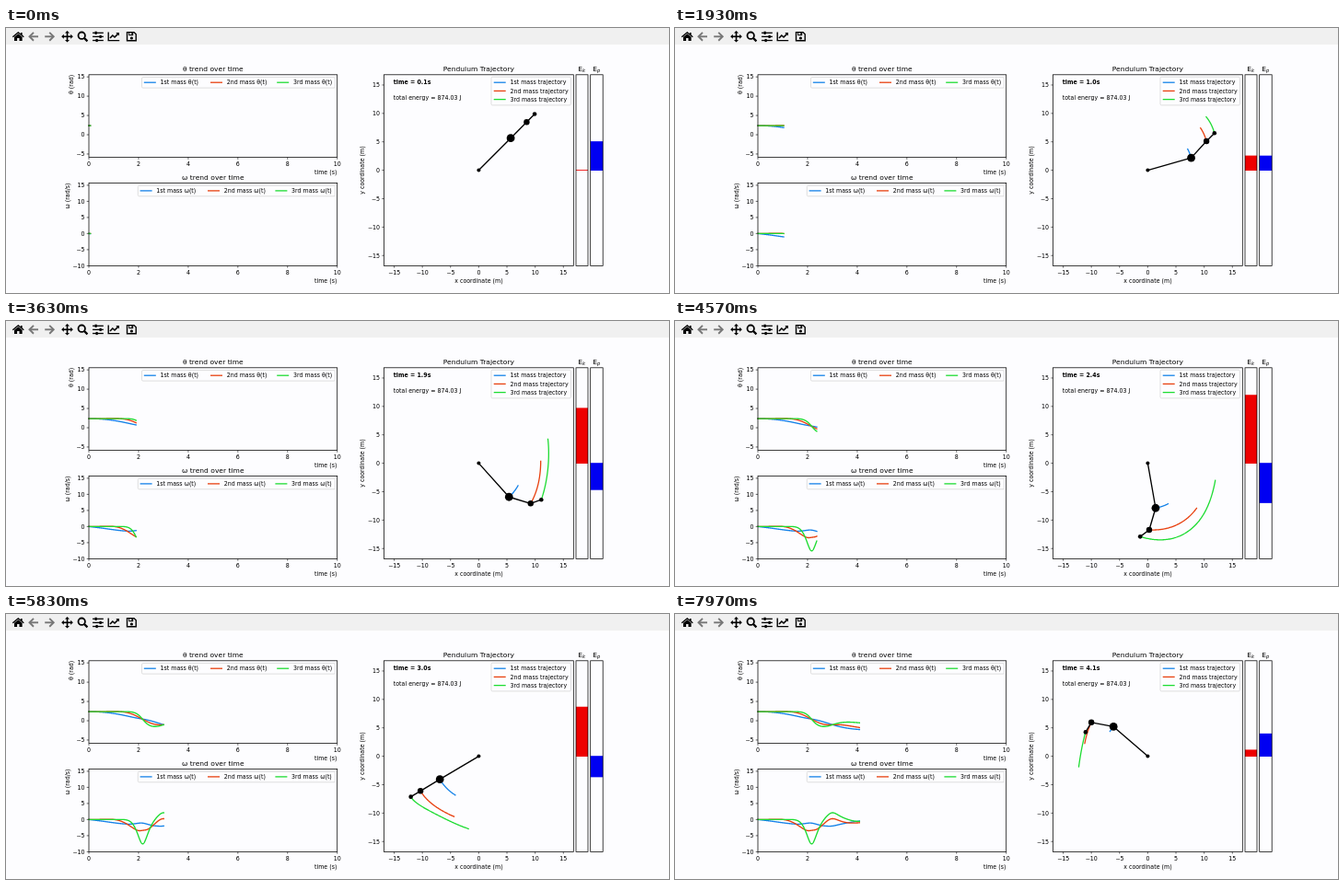
These frames come from a looping animation (720 px wide and 288 px high, 8 s). An HTML page with a canvas:

```html
<!DOCTYPE html>
<html lang="en">
<head>
<meta charset="utf-8">
<title>Triple pendulum</title>
<style>
  html, body { margin: 0; width: 100%; height: 100%; overflow: hidden; background: #fdfdff; }
  canvas { display: block; width: 720px; height: 288px; }
</style>
</head>
<body>
<canvas id="stage"></canvas>
<script>
const canvas = document.getElementById('stage');
const ctx = canvas.getContext('2d');
const dpr = window.devicePixelRatio || 1;
canvas.width = 720 * dpr;
canvas.height = 288 * dpr;

const LOOP = 8000;
const START = 0.06, STEP = 0.01687;
const COLORS = ['#1482e8', '#e8400f', '#1edc32'];
const NAMES = ['1st', '2nd', '3rd'];
const PAPER = '#fdfdff';

// ---------- physics ----------
const G = 9.81, DT = 0.005;
const MASS = [8, 4, 1], LEN = [8, 4, 2];
const TRAIL = [0.25, 0.435, 0.63];
const load = [13, 5, 1]; // mass carried by each rod

function solve3(a, b) {
  for (let i = 0; i < 3; i++) {
    for (let r = i + 1; r < 3; r++) {
      const f = a[r][i] / a[i][i];
      for (let c = i; c < 3; c++) a[r][c] -= f * a[i][c];
      b[r] -= f * b[i];
    }
  }
  for (let i = 2; i >= 0; i--) {
    for (let c = i + 1; c < 3; c++) b[i] -= a[i][c] * b[c];
    b[i] /= a[i][i];
  }
  return b;
}

// state: three angles from straight down, then three angular speeds
function derive(s) {
  const a = [], b = [];
  for (let i = 0; i < 3; i++) {
    a.push([]);
    b.push(-G * load[i] * LEN[i] * Math.sin(s[i]));
    for (let j = 0; j < 3; j++) {
      const k = load[Math.max(i, j)] * LEN[i] * LEN[j];
      a[i].push(k * Math.cos(s[i] - s[j]));
      b[i] -= k * Math.sin(s[i] - s[j]) * s[j + 3] ** 2;
    }
  }
  return [s[3], s[4], s[5], ...solve3(a, b)];
}

const shift = (s, d, h) => s.map((v, i) => v + d[i] * h);

function rk4(s) {
  const k1 = derive(s);
  const k2 = derive(shift(s, k1, DT / 2));
  const k3 = derive(shift(s, k2, DT / 2));
  const k4 = derive(shift(s, k3, DT));
  return s.map((v, i) => v + DT / 6 * (k1[i] + 2 * k2[i] + 2 * k3[i] + k4[i]));
}

const states = [[0.75 * Math.PI, 0.75 * Math.PI, 0.75 * Math.PI, 0, 0, 0]];
while (states.length < 860) states.push(rk4(states[states.length - 1]));

function stateAt(t) {
  const i = Math.floor(t / DT), f = t / DT - i;
  return states[i].map((v, n) => v + (states[i + 1][n] - v) * f);
}

function joints(s) {
  let x = 0, y = 0;
  return LEN.map((l, i) => {
    x += l * Math.sin(s[i]);
    y -= l * Math.cos(s[i]);
    return [x, y];
  });
}

// ---------- drawing helpers ----------
function text(s, x, y, o = {}) {
  ctx.save();
  ctx.translate(x, y);
  if (o.up) ctx.rotate(-Math.PI / 2);
  ctx.scale(0.1, 0.1);
  ctx.font = `${o.style || ''} ${(o.size || 6.3) * 10}px "DejaVu Sans", sans-serif`;
  ctx.textAlign = o.align || 'left';
  ctx.fillStyle = '#000';
  ctx.fillText(s, 0, 0);
  ctx.restore();
}

function line(points, color, width) {
  ctx.strokeStyle = color;
  ctx.lineWidth = width;
  ctx.beginPath();
  points.forEach(([x, y]) => ctx.lineTo(x, y));
  ctx.stroke();
}

function dot(x, y, r) {
  ctx.fillStyle = '#000';
  ctx.beginPath();
  ctx.arc(x, y, r, 0, 7);
  ctx.fill();
}

function shape(points, color) {
  ctx.fillStyle = color;
  ctx.beginPath();
  points.forEach(([x, y]) => ctx.lineTo(x, y));
  ctx.fill();
}

function box(x0, y0, x1, y1) {
  ctx.strokeStyle = '#000';
  ctx.lineWidth = 0.75;
  ctx.strokeRect(x0, y0, x1 - x0, y1 - y0);
}

const label = v => String(v).replace('-', '\u2212');

function xTick(v, x, y) {
  line([[x, y], [x, y + 2.3]], '#000', 0.6);
  text(label(v), x, y + 9.6, { align: 'center' });
}

function yTick(v, x, y) {
  line([[x - 2.3, y], [x, y]], '#000', 0.6);
  text(label(v), x - 4.5, y + 2.3, { align: 'right' });
}

function legendFrame(x0, y0, x1, y1) {
  ctx.beginPath();
  ctx.roundRect(x0, y0, x1 - x0, y1 - y0, 1.3);
  ctx.fillStyle = PAPER;
  ctx.fill();
  ctx.strokeStyle = '#d2d2d2';
  ctx.lineWidth = 0.7;
  ctx.stroke();
}

function legendItem(i, x, y, name) {
  line([[x, y], [x + 13, y]], COLORS[i], 1.3);
  text(`${NAMES[i]} mass ${name}`, x + 17.7, y + 2.2);
}

// ---------- toolbar ----------
function arrow(x, dir) {
  line([[x - 5 * dir, 9.3], [x + 4 * dir, 9.3]], '#777', 1.9);
  line([[x, 4.9], [x + 4.5 * dir, 9.3], [x, 13.7]], '#777', 1.9);
}

function toolbar() {
  ctx.fillStyle = '#f0f0f0';
  ctx.fillRect(0, 0, 720, 18);

  line([[7.3, 9.8], [13.3, 4.8], [19.3, 9.8]], '#000', 1.4);
  shape([[9, 9.8], [13.3, 6.3], [17.6, 9.8], [17.6, 14], [14.5, 14], [14.5, 11],
    [12.1, 11], [12.1, 14], [9, 14]], '#000');
  ctx.fillStyle = '#000';
  ctx.fillRect(16, 5, 1.6, 3);

  arrow(30, -1);
  arrow(47.2, 1);

  line([[62, 9.3], [71, 9.3]], '#000', 1.6);
  line([[66.5, 5], [66.5, 13.7]], '#000', 1.6);
  for (let q = 0; q < 4; q++) {
    ctx.save();
    ctx.translate(66.5, 9.3);
    ctx.rotate(q * Math.PI / 2);
    shape([[6.3, 0], [3.7, -2.5], [3.7, 2.5]], '#000');
    ctx.restore();
  }

  ctx.strokeStyle = '#000';
  ctx.lineWidth = 1.8;
  ctx.beginPath();
  ctx.arc(82.2, 8.2, 3.7, 0, 7);
  ctx.stroke();
  line([[84.9, 10.9], [88.4, 14.4]], '#000', 2.2);

  [[5.3, 97.6], [9.4, 102.6], [13.5, 98.6]].forEach(([y, knob]) => {
    line([[94, y], [105.8, y]], '#000', 1.3);
    ctx.fillRect(knob - 1.1, y - 1.6, 2.2, 3.2);
  });

  line([[111.2, 4.6], [111.2, 13.6], [123.2, 13.6]], '#000', 1.4);
  line([[113, 11], [115.8, 8], [118, 10], [121.6, 6.4]], '#000', 1.6);
  shape([[119.3, 5], [122.9, 5], [122.9, 8.6]], '#000');

  line([[131.5, 4.6], [139, 4.6], [141.2, 6.8], [141.2, 13.8], [131.5, 13.8], [131.5, 4]], '#000', 1.4);
  ctx.fillRect(133.2, 5, 5, 3.2);
  ctx.fillStyle = '#f0f0f0';
  ctx.fillRect(134, 5.4, 2.4, 1.7);
  dot(136.4, 11, 1.6);
}

// ---------- panels ----------
const X0 = 90, PX_S = 26.97;

function trend(p, now, state) {
  const yOf = v => p.zero - v * p.unit;
  for (let v = 0; v <= 10; v += 2) xTick(v, X0 + v * PX_S, p.bottom);
  for (let v = p.low; v <= 15; v += 5) yTick(v, X0, yOf(v));
  const last = Math.floor(now / DT);
  ctx.lineCap = 'square';
  for (let i = 0; i < 3; i++) {
    const pts = [];
    for (let n = 0; n <= last; n++) pts.push([X0 + n * DT * PX_S, yOf(states[n][i + p.offset])]);
    pts.push([X0 + now * PX_S, yOf(state[i + p.offset])]);
    line(pts, COLORS[i], 1.35);
  }
  ctx.lineCap = 'butt';
  box(X0, p.top, 359.7, p.bottom);
  text(`${p.sym} trend over time`, 224.8, p.top - 3.8, { size: 7.55, align: 'center' });
  text('time (s)', 359.4, p.bottom + 18.3, { align: 'right' });
  text(`${p.sym} (${p.unitName})`, p.labelX, p.top, { align: 'right', up: true });
  legendFrame(p.legend, p.top + 2.8, 357.4, p.top + 14.3);
  for (let i = 0; i < 3; i++) {
    legendItem(i, p.legend + 2.3 + i * p.gap, p.top + 8.4, `${p.sym}(t)`);
  }
}

const THETA = { sym: 'θ', unitName: 'rad', top: 50.8, bottom: 140.5, zero: 116, unit: 4.19,
  low: -5, offset: 0, labelX: 72.6, legend: 147.5, gap: 72.2 };
const OMEGA = { sym: 'ω', unitName: 'rad/s', top: 168.5, bottom: 258.4, zero: 223.4, unit: 3.5,
  low: -10, offset: 3, labelX: 69.3, legend: 143.3, gap: 73.4 };

const CX = 513.4, CY = 154.6;
const toPx = ([x, y]) => [CX + x * 6.125, CY - y * 6.176];

function trajectory(now, state, energy) {
  for (let v = -15; v <= 15; v += 5) {
    xTick(v, CX + v * 6.125, 258.4);
    yTick(v, 410.6, CY - v * 6.176);
  }
  text('Pendulum Trajectory', CX, 47, { size: 7.55, align: 'center' });
  text('x coordinate (m)', CX, 276.7, { align: 'center' });
  text('y coordinate (m)', 388.8, CY, { align: 'center', up: true });
  text(`time = ${now.toFixed(1)}s`, 420.8, 60.8, { style: 'bold' });
  text(`total energy = ${energy.toFixed(2)} J`, 420.8, 77.5);

  const pts = joints(state).map(toPx);
  ctx.lineJoin = 'round';
  for (let i = 0; i < 3; i++) {
    const path = [];
    const first = Math.ceil(Math.max(0, now - TRAIL[i]) / DT);
    for (let n = first; n * DT <= now; n++) path.push(toPx(joints(states[n])[i]));
    path.push(pts[i]);
    line(path, COLORS[i], 1.3);
  }
  line([[CX, CY], ...pts], '#000', 1.35);
  dot(CX, CY, 2);
  pts.forEach(([x, y], i) => dot(x, y, [4.4, 3.2, 2.3][i]));
  ctx.lineJoin = 'miter';

  box(410.6, 50.8, 616.3, 258.4);
  legendFrame(527, 53.2, 613.4, 83.9);
  for (let i = 0; i < 3; i++) legendItem(i, 529.7, 59.2 + i * 9.2, 'trajectory');
}

function energyBar(x0, x1, value, color, sub) {
  const h = value * 31.1 / 874;
  const top = CY - Math.max(h, 0) - 0.4, bottom = CY - Math.min(h, 0) + 0.4;
  ctx.fillStyle = color;
  ctx.fillRect(x0, top, x1 - x0, bottom - top);
  box(x0, 50.8, x1, 258.4);
  const mid = (x0 + x1) / 2;
  text('E', mid - 4.2, 46.8, { size: 7.55 });
  text(sub, mid + 0.6, 48, { size: 5.3, style: 'italic' });
}

function draw(ms) {
  const step = Math.floor((ms % LOOP + 5) * 0.03) % 240;
  const now = START + step * STEP;
  const state = stateAt(now);
  const potential = s => joints(s).reduce((sum, p, i) => sum + MASS[i] * G * p[1], 0);
  const total = potential(states[0]), ep = potential(state);

  ctx.setTransform(dpr, 0, 0, dpr, 0, 0);
  ctx.fillStyle = PAPER;
  ctx.fillRect(0, 0, 720, 288);
  toolbar();
  trend(THETA, now, state);
  trend(OMEGA, now, state);
  trajectory(now, state, total);
  energyBar(619, 632, total - ep, '#ee0000', 'k');
  energyBar(634.7, 648.2, ep, '#0000f2', 'p');
}

let begin = null;
function tick(t) {
  if (begin === null) begin = t;
  draw(t - begin);
  requestAnimationFrame(tick);
}
draw(0);
requestAnimationFrame(tick);
</script>
</body>
</html>
```
